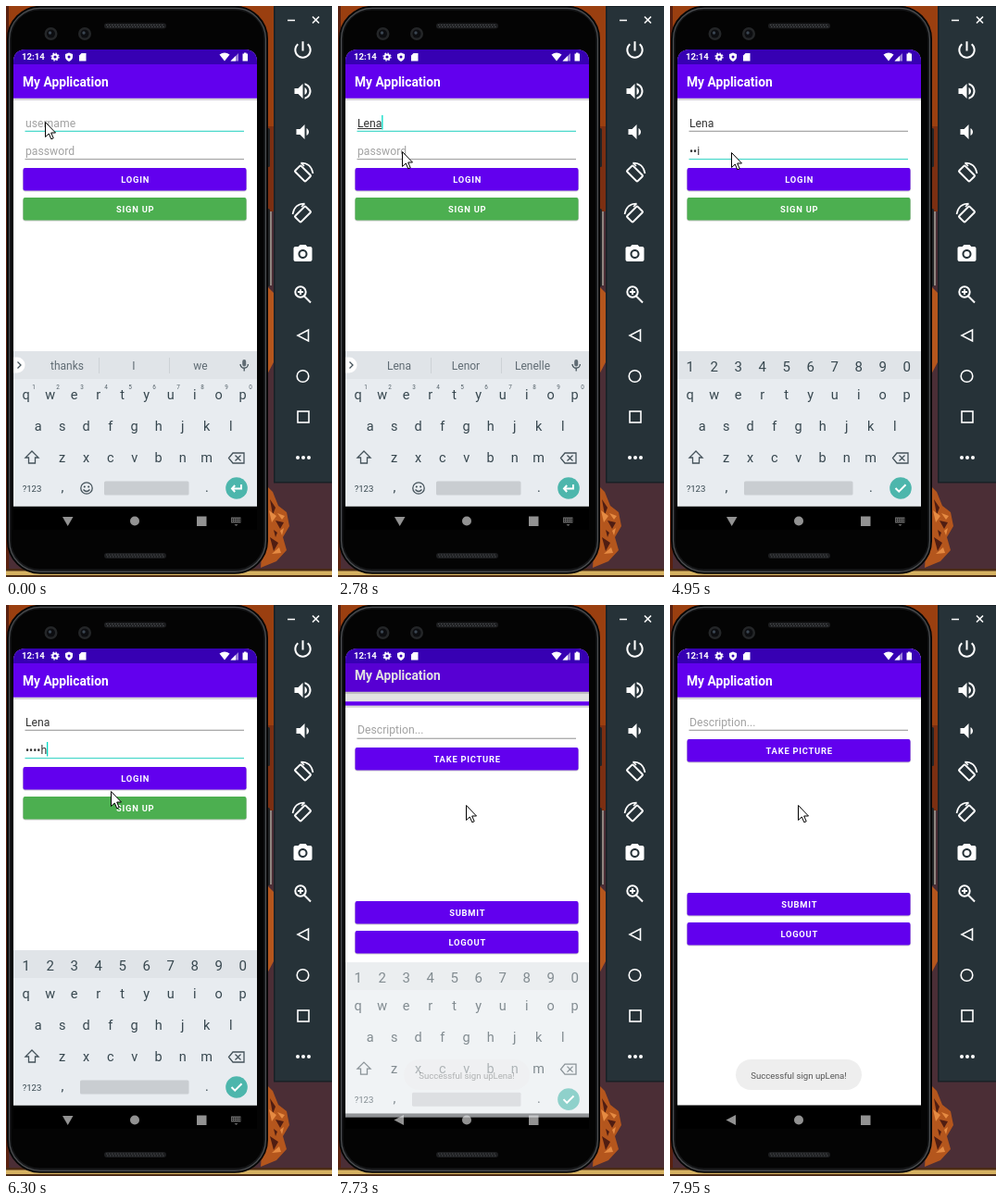
Recreate the animation shown at these times as an HTML page. Size 352x617 px, loop 8000 ms.

```html
<!DOCTYPE html>
<html lang="en">
<head>
<meta charset="utf-8">
<title>Login screen</title>
<style>
html, body { margin: 0; width: 100%; height: 100%; overflow: hidden; background: #000; }
svg { display: block; width: 352px; height: 617px; font-family: Roboto, sans-serif; }
.mid { text-anchor: middle; }
.btn { text-anchor: middle; font-weight: 700; letter-spacing: .75px; }
.line { fill: none; stroke: #fff; stroke-width: 2; }
.thin { fill: none; stroke: #fff; stroke-width: 1.6; }
.key { fill: none; stroke: #45535b; stroke-width: 1.3; }
</style>
</head>
<body>
<svg id="stage" viewBox="0 0 352 617"></svg>
<script>
const LOOP = 8000, NAME = 'Lena', SECRET = 'cmith';
const PURPLE = '#6200ee', TEAL = '#4fd9cc', GREY = '#a9a9a9', HINT = '#a2a2a2', INK = '#37474f';

const rect = (x, y, w, h, fill, more = '') =>
  `<rect x="${x}" y="${y}" width="${w}" height="${h}" fill="${fill}" ${more}/>`;
const disc = (x, y, r, fill, more = '') => `<circle cx="${x}" cy="${y}" r="${r}" fill="${fill}" ${more}/>`;
const path = (d, more = '') => `<path d="${d}" ${more}/>`;
const text = (x, y, s, size, fill, more = '') =>
  `<text x="${x}" y="${y}" font-size="${size}" fill="${fill}" ${more}>${s}</text>`;
const at = (x, y, body, more = '') => `<g transform="translate(${x} ${y}) ${more}">${body}</g>`;
const icon = (x, y, s, d) =>
  path(d, `fill="#fff" transform="translate(${x - 12 * s} ${y - 12 * s}) scale(${s})"`);
const button = (y, label, fill = PURPLE) =>
  rect(18, y + 1, 242, 24.5, '#000', 'rx="3" opacity=".2"') + rect(18.5, y, 241, 24.5, fill, 'rx="2"') +
  text(139.7, y + 15.8, label, 9.4, '#fff', 'class="btn"');
const underline = (y, id) => rect(20.5, y, 236.5, 1.3, GREY, `id="${id}"`);
const toolbar = rect(8, 99, 263, 3, '#000', 'opacity=".16"') + rect(8, 47, 263, 52.7, PURPLE) +
  text(18, 87, 'My Application', 13.8, '#fff', 'font-weight="700"');
const row = (keys, x, y, size = 14.5) =>
  [...keys].map((k, i) => text(x + i * 26, y, k, size, INK, 'class="mid"')).join('');

function wallpaper() {
  const rock = '#b4561d';
  return rect(0, 0, 352, 617, '#4b2e36') + rect(0, 0, 352, 130, '#9a3f10') + rect(0, 0, 3, 608, '#5a210f') +
    rect(282, 130, 8, 92, '#7b2f12') + rect(282, 222, 5, 80, '#8f8580') +
    path('M281 302L289 310V385L281 400Z', `fill="${rock}"`) +
    path('M281 518L288 525L294 540L303 547L306 562L299 574L303 588L292 600L275 607Z', `fill="${rock}"`) +
    path('M285 533l6 9-3 8zM291 556l9 2-4 7zM285 574l9 6-5 9zM289 566l4 3-2 5z', 'fill="#4f1d12"') +
    path('M284 545l8 6-5 7zM296 567l4-3-2 8zM287 592l8-7 2 6zM293 548l8 3-3 4z', 'fill="#e58a42"') +
    rect(0, 608, 352, 9, '#4a2a14') + rect(0, 610.5, 352, 4.5, '#d6b262');
}

function phone() {
  const grill = y => rect(106, y, 67, 6, '#1c1d1f', 'rx="3"') +
    path(`M108 ${y + 2}H171M109 ${y + 4}H171`, 'stroke="#4a4d50" stroke-width="1.2" stroke-dasharray="1.5 1.5"');
  const lens = x => disc(x, 30, 7, '#242628') + disc(x, 30, 4.5, '#0c0d10') + disc(x - 1, 29, 1.7, '#3b4652');
  return rect(281, 132, 4, 42, '#222426', 'rx="1.5"') + rect(281, 219, 4, 84, '#222426', 'rx="1.5"') +
    rect(2, .8, 280, 612, '#17181a', 'rx="35" stroke="#060606" stroke-width="2"') +
    rect(3.5, 2.3, 277, 609, 'none', 'rx="33.5" stroke="#4b4e51" stroke-width="1.2"') +
    rect(5.5, 4.5, 273, 604, '#040404', 'rx="31"') + grill(18.5) + grill(591) + lens(48.5) + lens(85);
}

function panel() {
  const turn = rect(-8, -4.5, 16, 9, 'none', 'rx="1" transform="translate(-.5 1) rotate(45)" class="line"') +
    path('M-2.500 -10.500Q8.500 -10.500 10.500 1M-2.500 -10.500L1 -7', 'class="thin"');
  return rect(289, 0, 63, 515.5, '#182126') + rect(290.5, 1, 61.5, 513, '#263238') +
    path('M304 15.500H312M331 11.500L338 18.500M338 11.500L331 18.500', 'class="thin"') +
    icon(320.5, 47.5, 1.02, 'M13 3h-2v10h2V3zm4.83 2.17l-1.42 1.42C17.99 7.86 19 9.81 19 12c0 3.87-3.13 7-7 7s-7-3.13-7-7c0-2.19 1.01-4.14 2.58-5.42L6.17 5.17C4.23 6.82 3 9.26 3 12c0 4.97 4.03 9 9 9s9-4.03 9-9c0-2.74-1.23-5.18-3.17-6.83z') +
    icon(320.5, 92, 1, 'M3 9v6h4l5 5V4L7 9H3zm13.5 3c0-1.77-1.02-3.29-2.5-4.03v8.05c1.48-.73 2.5-2.25 2.5-4.02zM14 3.23v2.06c2.89.86 5 3.54 5 6.71s-2.11 5.85-5 6.71v2.06c4.01-.91 7-4.49 7-8.77s-2.99-7.86-7-8.77z') +
    icon(320.5, 136, 1, 'M18.5 12c0-1.77-1.02-3.29-2.5-4.03v8.05c1.48-.73 2.5-2.25 2.5-4.02zM5 9v6h4l5 5V4L9 9H5z') +
    at(321, 180, turn) + at(320, 224, turn, 'scale(-1 1)') +
    icon(320.5, 268, 1, 'M9 2L7.17 4H4c-1.1 0-2 .9-2 2v12c0 1.1.9 2 2 2h16c1.1 0 2-.9 2-2V6c0-1.1-.9-2-2-2h-3.17L15 2H9zm3 15c-2.76 0-5-2.24-5-5s2.24-5 5-5 5 2.24 5 5-2.24 5-5 5z') +
    disc(320.5, 268, 3, '#fff') +
    path('M322 313.500L329 320.500M315 309H321M318 306V312', 'class="line"') + disc(318, 309, 5.7, 'none', 'class="line"') +
    path('M326.500 350V362L315 356Z', 'class="thin"') + disc(320.5, 400, 6.3, 'none', 'class="thin"') +
    rect(315, 438, 12, 12, 'none', 'class="thin"') +
    [315, 321, 327].map(x => disc(x, 488, 2, '#fff')).join('');
}

function statusBar() {
  return rect(8, 47, 263, 16, '#3700b3') + text(17, 58.4, '12:14', 9.6, '#fff', 'font-weight="700"') +
    disc(53, 55, 2.6, 'none', 'stroke="#fff" stroke-width="2"') +
    disc(53, 55, 4, 'none', 'stroke="#fff" stroke-width="1.2" stroke-dasharray="1.6 1.54"') +
    path('M68 50.500L72 52V55Q72 58 68 60Q64 58 64 55V52Z', 'fill="#fff"') + disc(68, 55, 1.5, '#3700b3') +
    path('M81.500 51H86.500V59.500H79V53.500Z', 'fill="#fff"') +
    path('M230.500 52.500Q236 48.500 241.500 52.500L236 59.500Z', 'fill="#fff"') +
    path('M251 51V59.500H242.500Z', 'fill="#fff" opacity=".5"') + path('M248 54V59.500H242.500Z', 'fill="#fff"') +
    path('M257 50.500H259.500V51.500H261V59.500H255.500V51.500H257Z', 'fill="#fff"');
}

function keyboard() {
  const superscripts = [...'1234567890'].map((n, i) => text(30 + i * 26, 414, n, 6.4, '#55626a', 'class="mid"')).join('');
  const words = [66, 138, 210].map(x => text(x, 393, '', 12, '#5f6b73', 'class="mid word"')).join('');
  const action = mark => disc(249, 521, 11.8, '#4db6ac') + at(249, 521, path(mark, 'class="line"'));
  return rect(8, 373, 263, 167.5, '#e8ecf0') + rect(8, 373, 263, 30, '#e0e4e8') +
    row('qwertyuiop', 21.7, 425) + row('asdfghjkl', 34.7, 458.6) + row('zxcvbnm', 60.7, 492.6) +
    at(28, 488, path('M0 -7L7 0H3.500V6H-3.500V0H-7Z', 'class="key"')) +
    at(249, 488.5, path('M-8.500 0L-4 -5.500H8V5.500H-4ZM-1.500 -3L4.500 3M4.500 -3L-1.500 3', 'class="key"')) +
    text(28, 524.5, '?123', 9.6, INK, 'class="mid"') + row(',', 61, 525) + row('.', 217, 525) +
    `<g id="letters">${superscripts}${words}
      ${path('M100.500 380V397M176.500 380V397', 'stroke="#cdd2d6"')}
      ${path('M8 379.500H12A8.500 8.500 0 0 1 12 396.500H8Z', 'fill="#fff"')}
      ${path('M12.500 384.500L16 388L12.500 391.500', 'class="key"')}
      ${rect(255.2, 382, 4, 7.5, '#5f6b73', 'rx="2"')}
      ${path('M253 387A4.200 4.200 0 0 0 261.400 387M257.200 391.500V394.500', 'class="key"')}
      ${disc(87, 521, 6.2, 'none', 'class="key"')}${disc(84.8, 519.5, 1, INK)}${disc(89.2, 519.5, 1, INK)}
      ${path('M83.500 522.500Q87 526.500 90.500 522.500', 'class="key"')}
      ${rect(106, 513.5, 91.5, 15, '#c9cdd1', 'rx="1.5"')}
      ${action('M5 -4V.5H-5M-1.800 -3L-5 .5L-1.800 4')}</g>` +
    `<g id="digits">${row('1234567890', 21.7, 394.5, 15)}${rect(80, 513.5, 117.5, 15, '#c9cdd1', 'rx="1.5"')}
      ${action('M-5.500 0L-1.800 3.700L5.500 -3.700')}</g>`;
}

const $ = id => document.getElementById(id);
$('stage').innerHTML = `
<clipPath id="screen"><path d="M8 566V61Q8 47 22 47H257Q271 47 271 61V566Z"/></clipPath>
<clipPath id="reveal"><rect id="opening" x="8" y="47" width="263" height="520"/></clipPath>
<clipPath id="pressed"><rect x="18.500" y="207" width="241" height="24.500" rx="2"/></clipPath>
${wallpaper()}${phone()}${panel()}
<g clip-path="url(#screen)">
  ${rect(8, 540, 263, 26, '#000')}
  ${path('', 'id="back" fill="#929292"')}${disc(139, 556.5, 5, '#929292')}${rect(206, 551.5, 10.5, 10.5, '#929292')}
  <g id="imeIcon">${rect(243, 552.5, 10.5, 6, '#666')}
    ${path('M244 554.500H253M244 556.500H253', 'stroke="#000" stroke-dasharray="1 1"')}${path('M246.500 560h4l-2 2z', 'fill="#666"')}</g>
  <g id="login">
    ${rect(8, 47, 263, 493.5, '#fff')}${toolbar}
    ${text(21, 130.5, '', 12.2, '#333', 'id="user"')}${rect(21, 132, 0, 1, '#333', 'id="composing"')}${underline(134.7, 'userLine')}
    ${text(21, 160.5, '', 12.2, '#333', 'id="pass"')}${underline(164.9, 'passLine')}
    ${rect(21, 118, 1.3, 15.5, '#03dac5', 'id="caret"')}
    ${button(175, 'LOGIN')}${button(207, 'SIGN UP', '#4caf50')}
    <g clip-path="url(#pressed)">${disc(138, 217, 0, '#fff', 'id="ripple"')}</g>
    ${rect(8, 47, 263, 493.5, '#000', 'id="dim"')}
  </g>
  <g clip-path="url(#reveal)"><g id="home">
    ${rect(8, 47, 263, 493.5, '#fff')}${toolbar}
    ${text(21, 130.5, 'Description...', 12.2, HINT)}${underline(134.7, 'noteLine')}
    ${button(145, 'TAKE PICTURE')}${button(311, 'SUBMIT')}${button(343, 'LOGOUT')}
  </g></g>
  <g id="keyboard">${keyboard()}</g>
  <g id="toast">${rect(71, 491, 136, 33, '#eeeeee', 'rx="16.500"')}
    ${text(139, 511.5, `Successful sign up${NAME}!`, 9.6, '#555', 'class="mid"')}</g>
  ${statusBar()}
</g>
<path id="mouse" d="M.5 .5V16.500L4.300 13L6.800 18.800L9.200 17.800L6.700 12H11.500Z" fill="#fff" stroke="#000"/>`;

const NAME_KEYS = [1200, 1330, 1450, 1560];
const SECRET_KEYS = [3980, 4230, 4420, 5070, 5160];
const MASK_LAST = 6560, FOCUS = 3190, TAP = 6770, OPEN = 7580;
const CARET = [[330, 850], [1200, 2040], [2540, 3000], [3330, 3770], [3980, 4950],
  [5070, 5640], [6140, 6580], [7090, 7600]];
const WORDS = [['thanks', 'I', 'we'], ['L', 'Love', 'Let'], ['Le', 'Let', 'Less'],
  ['Len', 'Lens', 'Lent'], [NAME, 'Lenor', 'Lenelle']];
const PATH = [[0, 42, 125], [2200, 42, 125], [2500, 181, 184], [2780, 69, 157], [2840, 66, 158],
  [5980, 66, 158], [6300, 113, 201], [6580, 138, 216], [LOOP, 138, 216]];

const words = document.querySelectorAll('.word');
const clamp = v => Math.max(0, Math.min(1, v));
const span = (t, from, length) => clamp((t - from) / length);
const set = (id, attrs) => { for (const k in attrs) $(id).setAttribute(k, attrs[k]); };
const show = (id, on) => set(id, { visibility: on ? 'visible' : 'hidden' });
const typed = (keys, t) => keys.filter(k => t >= k).length;

function field(id, value, hint) {
  $(id).textContent = value || hint;
  set(id, { fill: value ? '#333' : HINT });
  return value ? $(id).getComputedTextLength() : 0;
}

function pointer(t) {
  const i = PATH.findIndex(p => p[0] > t), a = PATH[i - 1], b = PATH[i];
  const p = span(t, a[0], b[0] - a[0]), e = p * p * (3 - 2 * p);
  return `translate(${a[1] + (b[1] - a[1]) * e} ${a[2] + (b[2] - a[2]) * e})`;
}

function draw(t) {
  const onPass = t >= FOCUS, n = typed(NAME_KEYS, t), m = typed(SECRET_KEYS, t);
  const dots = m && t < MASK_LAST ? m - 1 : m;
  const userEnd = field('user', NAME.slice(0, n), 'username');
  const passEnd = field('pass', '•'.repeat(dots) + SECRET.slice(dots, m), 'password');
  set('composing', { width: onPass ? 0 : userEnd });
  set('userLine', { fill: onPass ? GREY : TEAL });
  set('passLine', { fill: onPass ? TEAL : GREY });
  set('caret', { x: 20.8 + (onPass ? passEnd : userEnd), y: onPass ? 148 : 118 });
  show('caret', CARET.some(([a, b]) => t >= a && t < b));

  WORDS[typed(NAME_KEYS, t - 20)].forEach((w, i) => words[i].textContent = w);
  show('letters', t < FOCUS + 60);
  show('digits', t >= FOCUS + 60);

  const grow = span(t, TAP, 225);
  set('ripple', { r: 20 + 105 * grow, opacity: t < TAP ? 0 : .24 * (1 - span(t, TAP + 180, 220)) });

  // window change: the next screen is uncovered from below while both slide up
  const p = span(t, OPEN, 370), left = (1 - p) ** 1.72;
  set('login', { transform: `translate(0 ${-10 * (1 - left)})` });
  set('dim', { opacity: t < OPEN ? 0 : .02 + .16 * (1 - left) });
  set('home', { transform: `translate(0 ${22 * left})` });
  set('opening', { y: 47 + 519 * (1 - p) ** 4.2 });

  const drop = span(t, OPEN + 10, 230) ** 2;
  set('keyboard', { transform: `translate(0 ${35 * drop})`, opacity: 1 - drop });
  set('toast', { opacity: span(t, 7670, 150) });
  const closed = t >= 7680;
  set('back', { d: closed ? 'M71 551V562L60.500 556.500Z' : 'M61 552H72.500L66.700 562Z' });
  show('imeIcon', !closed);
  set('mouse', { transform: pointer(t) });
}

const start = performance.now();
function tick() {
  draw((performance.now() - start) % LOOP);
  requestAnimationFrame(tick);
}
tick();
</script>
</body>
</html>
```
